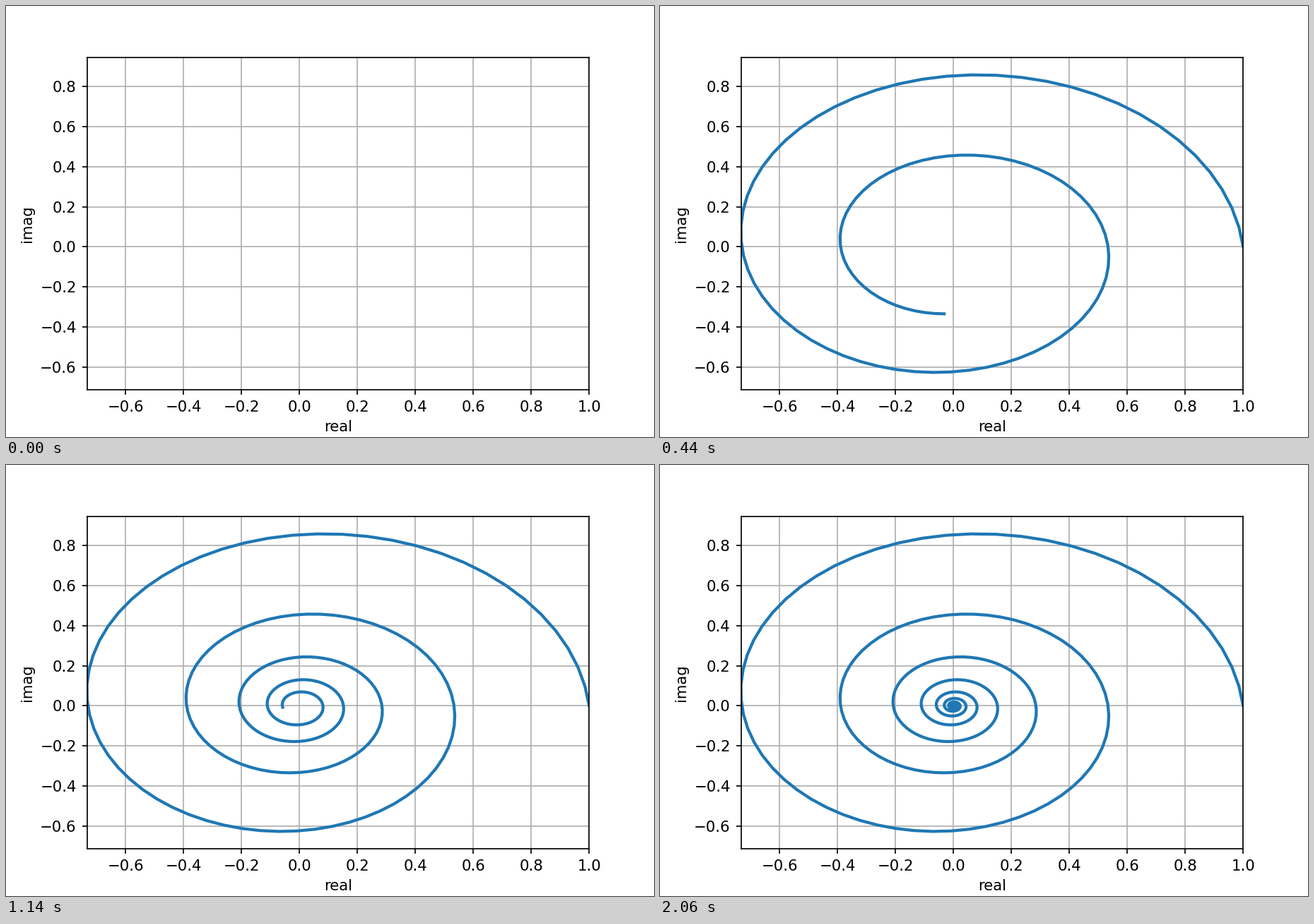
A matplotlib script that plays this animation: 917 by 611 pixels, repeating every 4 s.

```python
import numpy as np
import matplotlib.pyplot as plt
from matplotlib.animation import FuncAnimation

W, H, DPI = 917, 611, 152.8
FRAMES, INTERVAL = 200, 20
POINTS_PER_FRAME = 5

# damped rotation in the complex plane
t = 0.1 * np.arange(FRAMES * POINTS_PER_FRAME)
z = np.exp((-0.1 + 1j) * t)

# the tiny term guards against the pixel size being rounded down
fig, ax = plt.subplots(figsize=((W + 1e-6) / DPI, (H + 1e-6) / DPI), dpi=DPI)
fig.subplots_adjust(left=0.125, right=0.9, bottom=0.11, top=0.88)

pad = 0.1 * z.imag.max()
ax.set_xlim(z.real.min(), z.real.max())
ax.set_ylim(z.imag.min() - pad, z.imag.max() + pad)
ax.set_xlabel("real")
ax.set_ylabel("imag")
ax.grid(True)
line, = ax.plot([], [], color="#1f77b4", lw=2)


def init():
    line.set_data([], [])
    return line,


def update(i):
    part = z[:POINTS_PER_FRAME * i]
    line.set_data(part.real, part.imag)
    return line,


anim = FuncAnimation(fig, update, frames=FRAMES, init_func=init,
                     interval=INTERVAL, repeat=True, repeat_delay=0)
plt.show()
```
